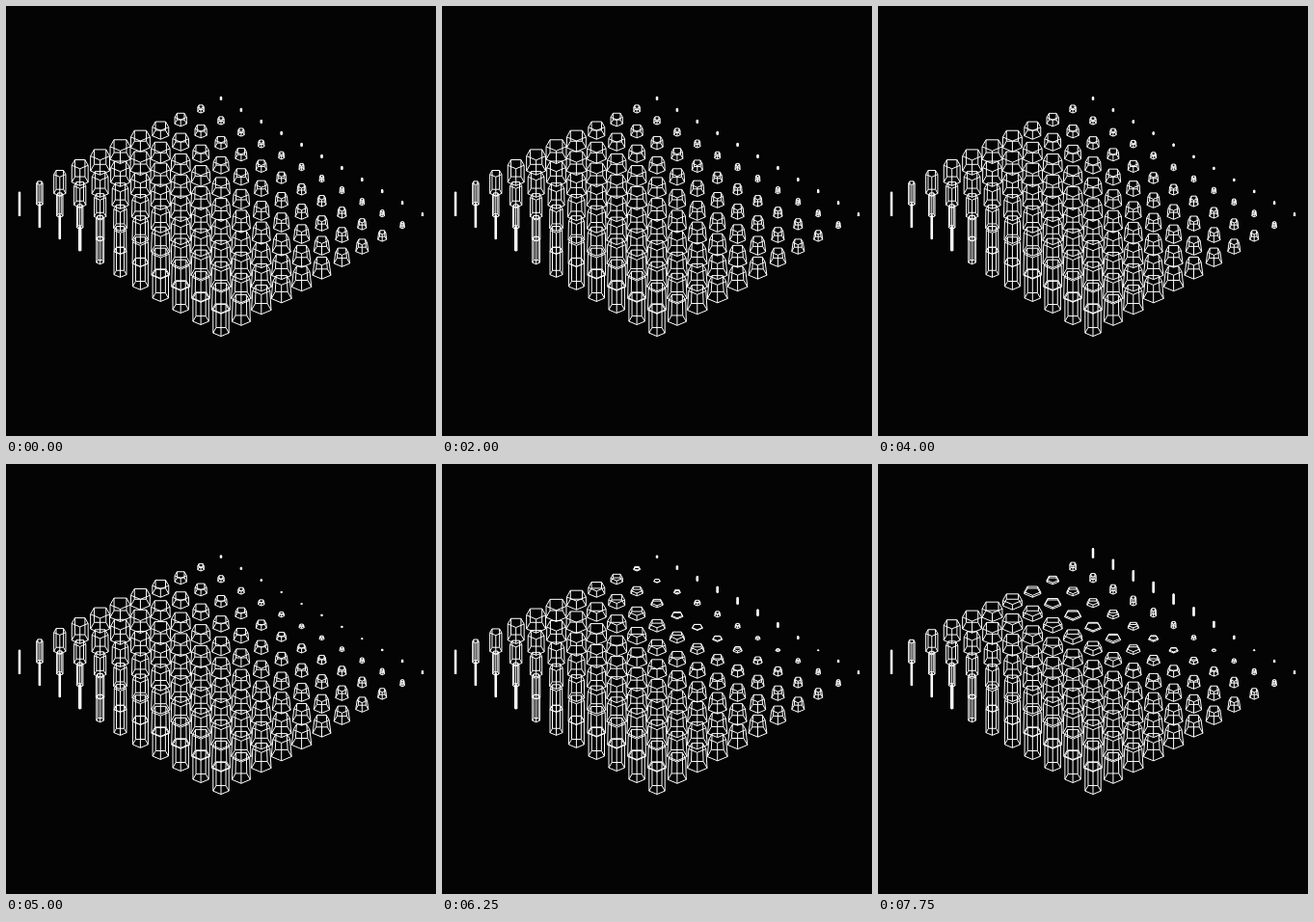
Animation, 446 px wide and 446 px high, one loop 8000 ms. Source, as an HTML page with a canvas:

```html
<!DOCTYPE html>
<html lang="en">
<head>
<meta charset="utf-8">
<title>Wireframe prisms</title>
<style>
html, body { margin: 0; width: 100%; height: 100%; overflow: hidden; background: #040404; }
canvas { display: block; width: 446px; height: 446px; }
</style>
</head>
<body>
<canvas id="stage"></canvas>
<script>
const LOOP = 8000, STEP = 250, SIZE = 446, LAST = 10, SIDES = 5;
const canvas = document.getElementById('stage');
const ctx = canvas.getContext('2d');
const scale = window.devicePixelRatio || 1;
canvas.width = canvas.height = SIZE * scale;
ctx.scale(scale, scale);
ctx.lineJoin = 'round';
ctx.lineWidth = 1;
ctx.strokeStyle = '#fff';
ctx.fillStyle = '#040404';

function smooth(x) {
  x = Math.min(1, Math.max(0, x));
  return x * x * (3 - 2 * x);
}

function radius(i, j) {
  const span = Math.PI - 0.9 * smooth((i - 2) / 4.5);
  return Math.max(0.8, 11 * Math.sin(span * j / LAST));
}

// Rows with a high i sink earlier and less; below the ground they rise again.
function height(i, j, t) {
  const ease = 1 / (1 + Math.exp((6.75 - 0.24 * i - t) / 0.6));
  const drop = 13.8 * (1 - smooth((i - 3) / 7)) * ease;
  return Math.abs(2.5 + 2.15 * j - drop * Math.pow(1 - j / LAST, 1.4));
}

// A flattened pentagon with one corner towards the viewer.
function ring(x, y, r) {
  return Array.from({ length: SIDES }, (_, k) => {
    const a = k * 2 * Math.PI / SIDES;
    return [x + r * Math.sin(a), y + r * Math.cos(a) * 0.577];
  });
}

function polygon(points) {
  points.forEach((p, k) => k ? ctx.lineTo(...p) : ctx.moveTo(...p));
  ctx.closePath();
}

function prism(i, j, t) {
  const x = 223 + (i - j) * 20.9;
  const y = 97 + (i + j) * 12.03;
  const r = radius(i, j);
  const taper = 1 - 0.02 * i * (1 - (j / LAST) ** 4);
  const base = ring(x, y, r);
  const top = ring(x, y - height(i, j, t), r * taper);
  ctx.beginPath();
  polygon(base);
  polygon(top);
  base.forEach((p, k) => {
    ctx.moveTo(...p);
    ctx.lineTo(...top[k]);
  });
  ctx.stroke();
}

function draw(now) {
  const t = Math.floor(now % LOOP / STEP) * STEP / 1000;
  ctx.fillRect(0, 0, SIZE, SIZE);
  for (let i = 0; i <= LAST; i++) {
    for (let j = 0; j <= LAST; j++) prism(i, j, t);
  }
}

const begin = performance.now();
function tick() {
  draw(performance.now() - begin);
  requestAnimationFrame(tick);
}
tick();
</script>
</body>
</html>
```
